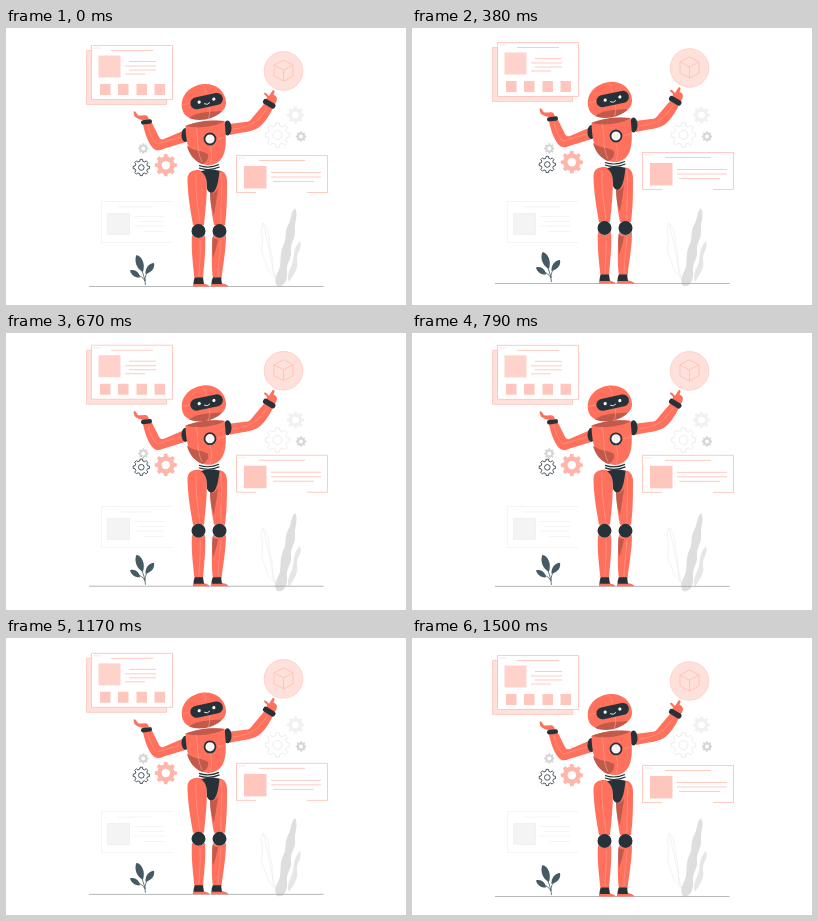
These frames come from a looping animation (400 by 277 pixels, 1.54 s). An HTML page:

```html
<!DOCTYPE html>
<html lang="en">
<head>
<meta charset="utf-8">
<title>Robot with floating panels</title>
<style>
  html, body { margin: 0; width: 100%; height: 100%; overflow: hidden; background: #fff; }
  svg { display: block; width: 100%; height: 100%; }
  .body { fill: #ff705d; }
  .shade { fill: #c25a4c; }
  .dark { fill: #263238; }
  .shine { fill: none; stroke: #ffa093; stroke-width: .6; }
  .pink { fill: none; stroke: #ffbdb3; stroke-width: .8; }
  .pale { fill: none; stroke: #f1f1f1; stroke-width: .8; }
</style>
</head>
<body>
<svg viewBox="0 0 400 277">
  <!-- still background -->
  <g class="pale">
    <path d="M95.5 173.5H166M95.5 173.5V214.5H166M112 179H147M128 188.500H158M133 193.500H158M128 198H158M137 203.500H158" />
    <path fill="#f4f4f4" stroke="#efefef" d="M101.500 185.500h22v21h-22z" />
  </g>
  <g id="stillGears"></g>
  <path fill="none" stroke="#ececec" stroke-width=".7" d="M269 250C264 240 268 232 265 223C262 214 265 203 257 195C253 202 258 209 256 217C254 227 260 232 261 239C263 246 267 246 269 250C265 231 261 211 257 195" />
  <path fill="#e6e6e6" d="M283 254C280 246 285 241 287 233C288 226 288 219 294 213C297 220 290 225 291 232C293 241 287 247 283 254" />
  <path fill="#dedede" d="M271 258C266 250 273 245 274 238C275 231 274 225 277 218C281 211 278 205 282 197C286 191 284 185 289 180C293 187 288 194 289 202C290 210 284 215 285 223C286 231 280 235 281 243C282 252 278 260 271 258" />

  <g id="floating">
    <path stroke="#a4a4a4" stroke-width=".8" d="M83 258.500H317.500" />

    <!-- upper left panel -->
    <path fill="#ffe1dc" stroke="#ffc6bd" stroke-width=".8" d="M80.500 22.500h80v54h-80z" />
    <path class="pink" style="fill:#fff" d="M85.500 17.500h81v54h-81z" />
    <path class="pink" d="M105 22.500H147M123 33.500H150M119 38H150M123 42H150M119 46H139" />
    <path class="pink" stroke-dasharray="1.200 1.300" d="M88 20H94" />
    <path fill="#ffd3cc" d="M92.500 27.500h22v22h-22z" />
    <path fill="#ffc6bd" d="M94 56h10.500v11H94zM112 56h10.500v11H112zM130.500 56H141v11h-10.500zM148.500 56H159v11h-10.500z" />

    <!-- right panel -->
    <path class="pink" d="M250 164.500H230.500V127.500H321.500V164.500H301M253 132.500H299M265 144.500H315M265 149H315M267 153.500H308" />
    <path class="pink" stroke-dasharray="1.200 1.300" d="M233 130H239" />
    <path fill="#ffc6bd" d="M238 138h22.500v22.500H238z" />

    <!-- cube badge -->
    <circle cx="277.500" cy="43" r="19.300" fill="#ffe1dc" stroke="#ffc9c0" stroke-width=".8" />
    <path class="pink" d="M277.500 32L287 37V48L277.500 53L268 48V37ZM268 37L277.500 42L287 37M277.500 42V53" />

    <g id="floatingGears"></g>

    <!-- plant -->
    <g fill="#455a64">
      <path fill="none" stroke="#455a64" stroke-width=".8" d="M139.500 257C139 249 136 243 133 236M139 253C139 247 141 245 144 241M139 253C137 249 134 248 130 246" />
      <path id="leaf" d="M137 244C130 241 128 232 130.500 227C136 228 139.500 236 137 244" />
      <path d="M139.500 246C139 240 143 235 148 235C149 240 146 244 139.500 246" />
      <path d="M134 249.500C129 250 125 247 124 242.500C129 241 133 244 134 249.500" />
    </g>

    <!-- legs -->
    <path class="body" d="M181.500 153C181 144 186 142 193 142L200 144C202 160 200 178 198 197H187C184 180 182 168 181.500 153M210 143C217 141 221 146 221 153C221 169 221 182 219 197H208C205 181 203 167 206 154Z" />
    <path class="shade" d="M204 164C207 167 210 164 212 160C211 170 209 179 208 187C205 179 204 172 204 164" />
    <path class="body" d="M186 207C190 211 195 211 199 207C200 222 198 237 197 251H188.500C187 236 185 221 186 207M207 207C211 211 216 211 220 207C220 222 217 237 215.500 251H207C205 236 206 221 207 207" />
    <path class="shade" d="M206.500 209C208 211 210 211.500 212 211C211 218 209 224 207 230C206 222 206 215 206.500 209" />
    <path class="shine" d="M190 145C189 163 192 179 194 195M215 145C217 163 214 179 215 195M194 212C195 225 193 238 193 248M215 212C214 226 212 238 212 248" />
    <path class="body" d="M187 258.500V256C191 254 196 254 203 257.500V258.500ZM205 258.500V256C210 254 216 254 222 257.500V258.500Z" />
    <path class="dark" d="M189 249.500H197L198 256H187.500C187.500 253 188 251 189 249.500M207 249.500H215L216 256H205.500C205.500 253 206 251 207 249.500" />
    <circle class="dark" cx="192.500" cy="203" r="7" />
    <circle class="dark" cx="213.500" cy="203" r="7" />
    <path class="dark" d="M195 143.500C201 141 207 141 213.500 143C212.500 150 212 158 208.500 163C206 166 202.500 165 201 161C201 151 200 147 195 143.500" />
    <path fill="none" stroke="#263238" stroke-width="1.200" d="M193 137.500Q203 141 213 136.500M193 140Q203 143.500 213.500 139" />

    <!-- arms -->
    <path class="body" d="M179 102L158 111C156 112 154 111 153 109L146 95L137 96.500C139 106 142 114 146 119C149 123 153 123 157 121L180 114Z" />
    <path class="body" d="M143 91.500C138 93 134 92 131 90C128 89 128 86 127.500 84Q128.500 82.500 130 84.500L132 87.500C136 88 140 86 142 89Z" />
    <rect class="dark" x="135" y="91.700" width="11" height="4.500" rx="2" transform="rotate(-7 140.500 94)" />
    <path class="body" d="M223 96L239 94C243 94 245 92 247 89L258 76L267 80C263 88 258 96 252 100C246 104 236 104 224 107Z" />
    <path class="body" d="M260 73L261 69L258 66Q258 64 260 65L263 68L266.500 62.500Q269 61.500 268.500 64L267.500 67C272 68 272 73 268 77Z" />
    <rect class="dark" x="256.500" y="73" width="13.500" height="5.500" rx="2.500" transform="rotate(31 263.200 75.700)" />
    <path class="shine" d="M142 98C144 106 147 113 151 116L175 109M227 101C242 99 251 96 261 80" />
    <ellipse class="dark" cx="179.500" cy="107" rx="4" ry="7" />
    <ellipse class="dark" cx="221.500" cy="100" rx="4" ry="7.500" />

    <!-- torso -->
    <path class="body" d="M179.500 98C190 94 208 92 218.500 93C220 106 221 119 217 128C213 136 205 139 196 136C185 132 180 119 179.500 98" />
    <path class="shade" d="M181 118C187 123 195 122 202 126C203 131 200 135 196 136C188 133 183 126 181 118" />
    <path class="shade" d="M179.500 98C190 93 208 91 218.500 93.500C209 99 190 101 179.500 98" />
    <path class="shine" d="M190 99C193 111 190 122 196 134M204 118C206 125 206 130 204 136M211 111L219 109" />
    <circle cx="204" cy="111" r="5.500" fill="#f5f5f5" stroke="#263238" stroke-width="1.800" />
  </g>

  <g id="head">
    <path class="body" d="M176 80C174 68 183 58 197 56C209 55 219 62 220 74C220 79 218 82 214 85C205 91 192 93 184 90C179 88 177 85 176 80" />
    <path class="shade" d="M183 90C192 83 206 84 216 83C208 92 192 94 183 90" />
    <path class="shine" d="M196 56.500C199 59 200 62 200 66M177 77L185 75M203 79C204 83 204 87 202 91" />
    <g transform="rotate(-12 201 72.500)">
      <rect class="dark" x="184" y="67" width="33" height="12" rx="6" />
      <g fill="#fff">
        <circle cx="193" cy="72.500" r="1.600" />
        <circle cx="208" cy="72.500" r="1.600" />
      </g>
      <path fill="none" stroke="#fff" stroke-width=".8" d="M197.500 75Q200.500 77.500 203.500 75" />
    </g>
  </g>
</svg>
<script>
  const LOOP = 1540, PEAK = 700, LIFT = 5.3, HEAD_LIFT = 3.6;
  const floating = document.getElementById('floating');
  const head = document.getElementById('head');

  function gear(x, y, radius, hole, teeth, fill, stroke = 'none') {
    const points = [];
    for (let i = 0; i < teeth; i++) {
      [[-.30, .78], [-.19, 1], [.19, 1], [.30, .78]].forEach(([turn, scale]) => {
        const angle = (i + turn) / teeth * 2 * Math.PI;
        points.push(`${x + radius * scale * Math.cos(angle)},${y + radius * scale * Math.sin(angle)}`);
      });
    }
    return `<g fill="${fill}" stroke="${stroke}" stroke-width=".9" stroke-linejoin="round">
      <polygon points="${points.join(' ')}"/>
      <circle cx="${x}" cy="${y}" r="${hole}" fill="#fff"/></g>`;
  }

  document.getElementById('stillGears').innerHTML =
    gear(271.5, 107, 12.3, 4.5, 8, '#fff', '#eaeaea') +
    gear(289.5, 87, 8.7, 3.3, 8, '#f1f1f1') +
    gear(295, 108.5, 5.3, 2, 8, '#d6d6d6') +
    gear(137.3, 120.5, 5.3, 2, 8, '#d6d6d6');
  document.getElementById('floatingGears').innerHTML =
    gear(135.3, 139.5, 8.2, 2.8, 8, '#fff', '#37474f') +
    gear(159.8, 137.2, 11.2, 4.2, 8, '#ffb5aa');

  function draw(now) {
    const t = now % LOOP;
    const phase = t < PEAK ? t / PEAK : (LOOP - t) / (LOOP - PEAK);
    const rise = (1 - Math.cos(Math.PI * phase)) / 2;
    floating.setAttribute('transform', `translate(0 ${-LIFT * rise})`);
    head.setAttribute('transform', `translate(0 ${-HEAD_LIFT * rise})`);
    requestAnimationFrame(draw);
  }
  draw(performance.now());
</script>
</body>
</html>
```
